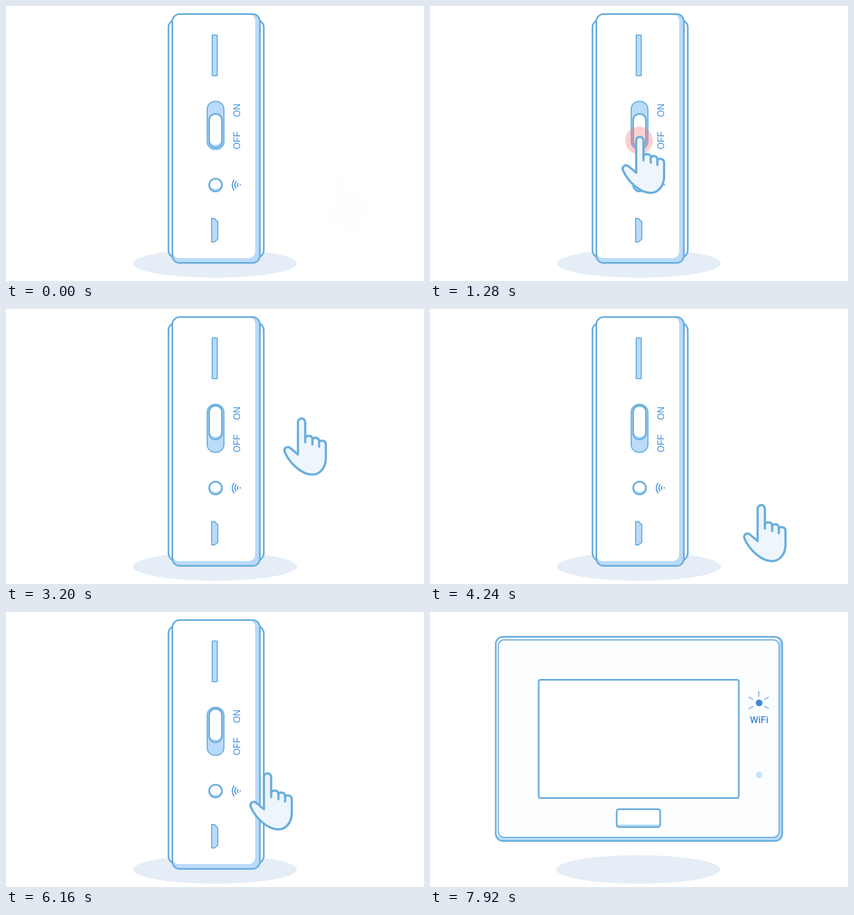
Write an HTML page that moves like this. It is 750 px wide and 493 px high and loops after 8 s.

```html
<!DOCTYPE html>
<html lang="en">
<head>
<meta charset="utf-8">
<title>Switch on and pair</title>
<style>
  html, body { margin: 0; width: 100%; height: 100%; overflow: hidden; background: #fff; }
  svg { display: block; width: 100%; height: 100%; }
  .line { stroke: #6aaedd; stroke-width: 3; fill: none; }
  .thin { stroke-width: 2; }
  .white { fill: #fff; }
  .blue { fill: #b9dbf9; }
  .shadow { fill: #e5edf6; }
  .ink { fill: #3a89d8; }
  .mark { stroke: #3a89d8; stroke-width: 1.7; fill: none; stroke-linecap: round; }
  .label { font: 16px "Liberation Sans", Arial, sans-serif; }
  .wifi { font: 500 17px Roboto, sans-serif; text-anchor: middle; }
</style>
</head>
<body>
<svg viewBox="0 0 750 493">
  <g id="device">
    <ellipse class="shadow" cx="375" cy="461.5" rx="147" ry="25.5"/>
    <rect class="line white" x="291.5" y="24.5" width="171" height="427" rx="14"/>
    <rect class="blue" x="298.5" y="14.5" width="157" height="446" rx="13"/>
    <rect class="white" x="298.5" y="14.5" width="148.5" height="437.5" rx="12"/>
    <rect class="line" x="298.5" y="14.5" width="157" height="446" rx="13"/>
    <rect class="line thin blue" x="370" y="52" width="9" height="73" rx="1"/>

    <rect class="line thin blue" x="361" y="171" width="30" height="86" rx="14"/>
    <g id="knob">
      <rect class="blue" x="364.5" y="193.5" width="23" height="60" rx="11"/>
      <rect class="white" x="365" y="194" width="22" height="55" rx="10"/>
      <rect class="line" x="364.5" y="193.5" width="23" height="60" rx="11"/>
    </g>
    <text class="label ink" transform="translate(420 199) rotate(-90)">ON</text>
    <text class="label ink" transform="translate(420 257) rotate(-90)">OFF</text>

    <circle class="blue" cx="376" cy="321" r="11.5"/>
    <ellipse class="white" cx="376" cy="319" rx="10.5" ry="9"/>
    <circle class="line" cx="376" cy="321" r="11.5"/>
    <path class="mark" d="M409 312q-6 9 0 18M413 314.5q-5 6 0 12M416.5 318q-2.5 2.7 0 5.4"/>
    <circle class="ink" cx="420.3" cy="320.6" r="1.2"/>
    <path class="line thin blue" stroke-linejoin="round" d="M369 381h5l6 6v31l-6 5h-5z"/>

    <circle id="press" cx="375" r="25" fill="#fa6e6e" fill-opacity=".33"/>
    <g id="hand" class="line" style="stroke-width:4;stroke-linecap:round;stroke-linejoin:round">
      <path fill="#eef5fd" d="M370 299V241a6.5 6.5 0 0 1 13 0V269c3-5 13-5 13 3c3-5 12-4 12 4c3-3 12-3 12 5V306c0 17-11 29-24 29c-20 0-41-21-49-39c-4-8 4-14 10-8z"/>
      <path d="M383 266v11M396 271v10M408 276v9"/>
    </g>
  </g>

  <g id="panel">
    <ellipse class="shadow" cx="373.5" cy="461.5" rx="147" ry="25.5"/>
    <rect class="blue" x="118" y="44.5" width="514" height="366" rx="13"/>
    <rect class="white" x="118" y="44.5" width="509" height="360" rx="12"/>
    <rect class="line" x="118" y="44.5" width="514" height="366" rx="13"/>
    <rect class="line thin" style="fill:#fbfdff" x="122.5" y="50" width="504" height="354" rx="10"/>
    <rect class="line white" x="195" y="121.5" width="359" height="212" rx="3"/>
    <rect class="white" x="335" y="353.5" width="78" height="32" rx="4"/>
    <rect class="blue" x="336" y="381" width="76" height="4"/>
    <rect class="line" x="335" y="353.5" width="78" height="32" rx="4"/>
    <circle class="ink" cx="590.5" cy="163" r="6"/>
    <text class="wifi ink" x="590.5" y="199">WiFi</text>
    <circle cx="590.5" cy="292" r="6" fill="#cbe4fb"/>
    <path id="rays" class="mark" style="stroke-linecap:butt"
      d="M590 142v10M572 152.5l8 4.5M608 152.5l-8 4.5M572 173.5l8-4.5M608 173.5l-8-4.5"/>
  </g>
</svg>
<script>
  const LOOP = 8000, LIFT = 75;
  const [device, knob, press, hand, panel, rays] =
    ['device', 'knob', 'press', 'hand', 'panel', 'rays'].map(id => document.getElementById(id));

  const ramp = (t, from, to) => Math.min(1, Math.max(0, (t - from) / (to - from)));
  const ease = p => (p + p * p * (3 - 2 * p)) / 2;
  const show = (el, opacity) => el.setAttribute('opacity', opacity);
  const move = (el, x, y) => el.setAttribute('transform', `translate(${x} ${y})`);

  // Hand moves: start time, end time, start point, end point, height of the arc
  const moves = [
    [400, 1240, 223, 68, 0, 0, LIFT],
    [1680, 2160, 0, 0, 0, -20, 0],
    [2400, 3280, 0, -20, 163, -35, LIFT],
    [4240, 5040, 218, 117, 1, 81, LIFT],
    [5760, 6560, 1, 81, 184, 66, LIFT]
  ];

  function handAt(t) {
    const [from, to, x0, y0, x1, y1, lift] = moves.findLast(m => t >= m[0]) || moves[0];
    const p = ease(ramp(t, from, to));
    return [x0 + (x1 - x0) * p, y0 + (y1 - y0) * p - lift * p * (1 - p)];
  }

  function draw(t) {
    show(device, 1 - ramp(t, 6480, 6640));
    show(panel, ramp(t, 6550, 6900));

    move(hand, ...handAt(t));
    show(hand, t < 4240 ? ramp(t, 0, 240) - ramp(t, 3280, 3520) : 1);
    move(knob, 0, -20 * ease(ramp(t, 1680, 2160)));

    const first = t >= 1280 && t < 1680, second = t >= 5120 && t < 5760;
    press.setAttribute('cy', first ? 241 : 322);
    show(press, first || second ? 1 : 0);

    // Rays pulse: 240 ms in, 240 ms out
    show(rays, t < 7120 ? 0 : 1 - Math.abs((t - 7120) % 480 / 240 - 1));
  }

  const start = performance.now();
  function tick() {
    draw((performance.now() - start) % LOOP);
    requestAnimationFrame(tick);
  }
  tick();
</script>
</body>
</html>
```
